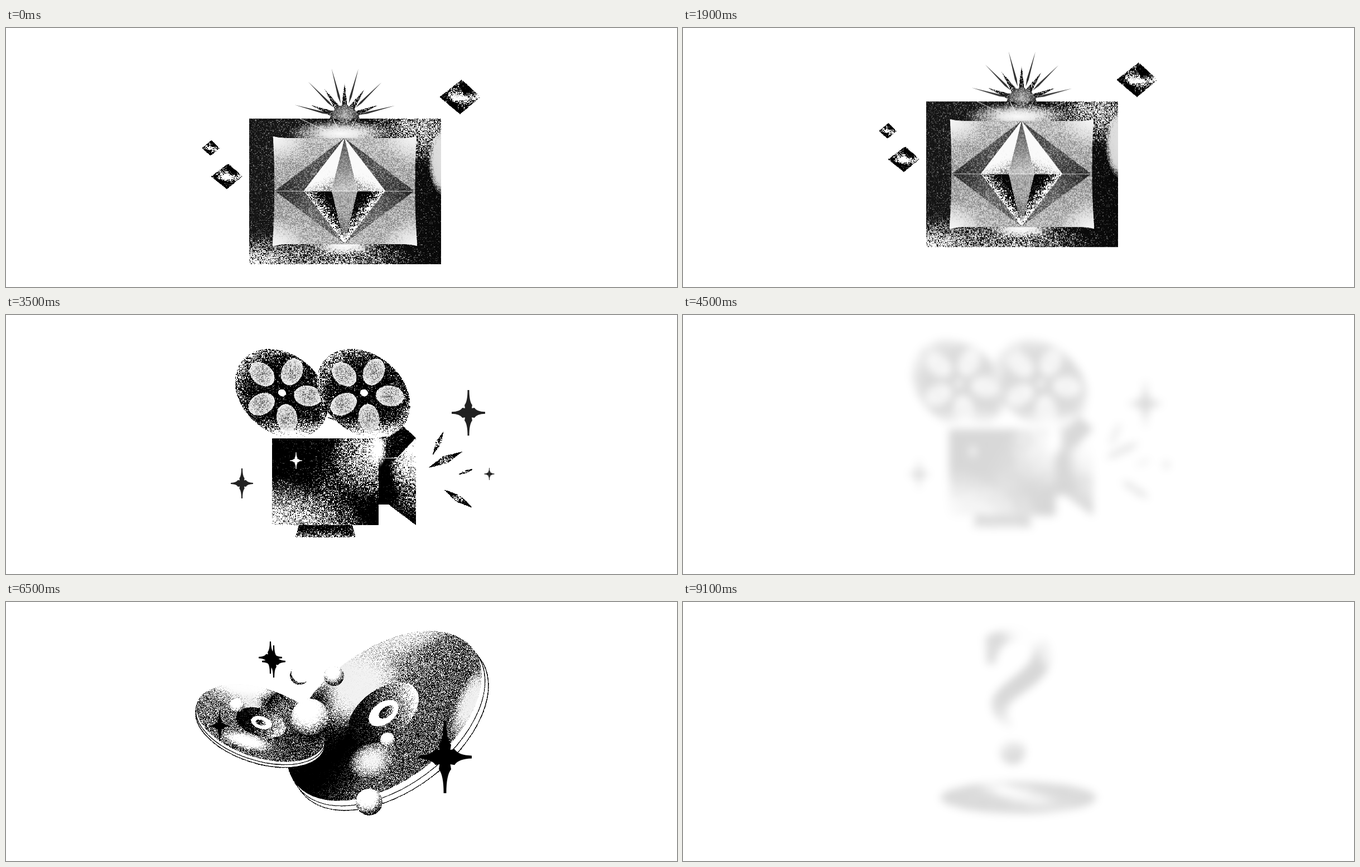
An HTML page with a canvas that plays this animation: 1203x466 px, repeating every 9200 ms.

```html
<!DOCTYPE html>
<html lang="en">
<head>
<meta charset="utf-8">
<title>Stippled objects</title>
<style>
  html, body { margin: 0; width: 100%; height: 100%; overflow: hidden; background: #fff; }
  canvas { display: block; }
</style>
</head>
<body>
<canvas id="stage" width="1203" height="466"></canvas>
<script>
const W = 1203, H = 466, SCENE = 2300, RISE = 31, RAD = Math.PI / 180;
let g; // context of the scene being built

// Before the grain pass a colour means: red = share of light specks,
// green = dark speck level, blue = light speck level.
const ink = ([p, d = 0, l = 255], a = 1) => `rgba(${p * 255},${d},${l},${a})`;
const clamp = v => Math.max(0, Math.min(1, v));
const polar = (x, y, r, deg) => [x + r * Math.cos(deg * RAD), y + r * Math.sin(deg * RAD)];

const poly = (...pts) => {
  const p = new Path2D();
  for (let i = 0; i < pts.length; i += 2) p.lineTo(pts[i], pts[i + 1]);
  p.closePath();
  return p;
};
const oval = (x, y, rx, ry = rx, deg = 0) => {
  const p = new Path2D();
  p.ellipse(x, y, rx, ry, deg * RAD, 0, 7);
  return p;
};
const box = (x, y, x2, y2) => poly(x, y, x2, y, x2, y2, x, y2);

// Long thin rhombus; wide is where its broadest point lies
const spike = (x, y, x2, y2, w, wide = 0) => {
  const n = w / Math.hypot(x2 - x, y2 - y), ox = (y - y2) * n, oy = (x2 - x) * n;
  const mx = x + (x2 - x) * wide, my = y + (y2 - y) * wide;
  return poly(x, y, mx + ox, my + oy, x2, y2, mx - ox, my - oy);
};

const ramp = (grad, tones) => {
  tones.forEach((t, i) => grad.addColorStop(i / (tones.length - 1), ink(t)));
  return grad;
};
const lin = (x, y, x2, y2, ...tones) => ramp(g.createLinearGradient(x, y, x2, y2), tones);
const rad = (x, y, r, ...tones) => ramp(g.createRadialGradient(x, y, 0, x, y, r), tones);

// Shine around a centre: light(deg) gives the share of light, bright parts turn smooth grey
const sweep = (x, y, light) => ramp(g.createConicGradient(0, x, y), Array.from({ length: 61 }, (_, i) => {
  const p = clamp(light(i * 6)), smooth = clamp((p - 0.5) / 0.45);
  return [p, 210 * smooth, 255 - 18 * smooth];
}));
const bump = (deg, mid, width) => {
  const d = Math.abs(deg - mid);
  return Math.exp(-((Math.min(d, 360 - d) / width) ** 2));
};

function fill(path, paint) {
  g.fillStyle = Array.isArray(paint) ? ink(paint) : paint;
  g.fill(path);
}

// Soft elliptical patch of one tone, kept inside a path
function glow(clip, x, y, rx, ry, deg, tone, solid = 0.3) {
  g.save();
  g.clip(clip);
  g.translate(x, y);
  g.rotate(deg * RAD);
  g.scale(rx, ry);
  const grad = g.createRadialGradient(0, 0, 0, 0, 0, 1);
  grad.addColorStop(0, ink(tone));
  grad.addColorStop(solid, ink(tone, 0.85));
  grad.addColorStop(1, ink(tone, 0));
  g.fillStyle = grad;
  g.fillRect(-1, -1, 2, 2);
  g.restore();
}

function line(x, y, x2, y2) {
  g.strokeStyle = "rgba(255,255,255,.75)";
  g.lineWidth = 1.2;
  g.beginPath();
  g.moveTo(x, y);
  g.lineTo(x2, y2);
  g.stroke();
}

function star(x, y, rx, ry, color = "#000") {
  g.fillStyle = color;
  for (const sx of [-1, 1]) for (const sy of [-1, 1]) {
    g.save();
    g.translate(x, y);
    g.scale(rx * sx, ry * sy);
    g.beginPath();
    g.moveTo(-0.02, -0.02);
    g.lineTo(-0.02, 1);
    g.lineTo(0.05, 1);
    g.quadraticCurveTo(0.05, 0.5, 0.23, 0.34);
    g.lineTo(0.2, 0.2);
    g.lineTo(0.36, 0.22);
    g.quadraticCurveTo(0.5, 0.05, 1, 0.04);
    g.lineTo(1, -0.02);
    g.fill();
    g.restore();
  }
}

function gem(x, y, rx, ry) {
  const shape = poly(x - rx, y, x + rx * 0.08, y - ry, x + rx, y, x, y + ry);
  fill(shape, lin(0, y - ry, 0, y + ry, [0.15], [0.3], [0.75], [0.25], [0.05]));
  glow(shape, x + rx * 0.4, y - ry * 0.5, rx * 0.55, ry * 0.6, 40, [0]);
  glow(shape, x - rx * 0.4, y + ry * 0.5, rx * 0.55, ry * 0.6, 40, [0]);
  glow(shape, x - rx * 0.9, y, rx * 0.5, ry * 0.6, 0, [0.1]);
  glow(shape, x, y + ry * 0.08, rx * 0.65, ry * 0.3, 0, [0.95]);
}

function jewel() {
  const frame = box(436, 163, 780, 425);
  fill(frame, lin(436, 0, 780, 0, [0.2, 20, 110], [0.22, 20, 130], [0.25, 15, 150], [0.15, 12, 200], [0.1, 8, 160]));
  glow(frame, 450, 425, 150, 60, 0, [0.75, 10]);
  glow(frame, 600, 420, 140, 48, 0, [0.5, 20, 240]);
  glow(frame, 745, 180, 90, 70, 0, [0.65, 20, 240]);
  glow(frame, 785, 240, 28, 62, 0, [1, 225, 225], 0.65);
  glow(frame, 600, 190, 95, 24, 0, [1, 225, 250]);
  glow(frame, 607, 392, 62, 17, 0, [1, 200, 250]);

  const panel = new Path2D("M479 195Q490 198 500 198H715Q726 198 736 195Q730 293 737 392Q726 389 715 389H500Q490 389 478 393Q484 293 479 195Z");
  fill(panel, lin(0, 196, 0, 392, [0.55, 160, 215], [0.45, 135, 200], [0.55, 150, 210]));
  for (const x of [480, 735]) for (const y of [196, 392])
    glow(panel, x, y, 62, 50, 0, [1, 240, 245], 0.2);

  // Each half mirrors the other about the middle axis
  for (const side of [-1, 1]) {
    const at = dx => 607 + side * dx;
    const facet = (tip, a, b, paint) => fill(poly(607, tip, at(a), 293, at(b), 293), paint);
    facet(198, 125, 73, lin(607, 205, at(115), 293, [0.35, 55, 120], [0.4, 70, 150], [0.3, 40, 110]));
    facet(198, 73, 23, lin(at(42), 240, at(18), 292, [1, 240, 250], [0.9, 205, 250], [0.4, 90, 230]));
    facet(388, 125, 73, lin(at(115), 293, 607, 385, [0.25, 35, 100], [0.45, 85, 160], [0.4, 70, 175]));
    facet(388, 73, 23, lin(at(19), 300, at(51), 326, [0, 5], [0.18, 5], [0.85, 20]));
  }
  fill(poly(607, 198, 584, 293, 630, 293), lin(590, 210, 610, 293, [0.3, 80, 130], [0.4, 125, 165], [0.6, 175, 215]));
  fill(poly(607, 388, 584, 293, 630, 293), lin(600, 293, 613, 388, [0.5, 155, 190], [0.5, 125, 185], [0.3, 60, 120]));
  glow(poly(534, 293, 680, 293, 607, 388), 607, 388, 25, 34, 0, [0.8, 40]);

  for (let deg = 202; deg < 340; deg += 34) {
    const [x, y] = polar(607, 163, 64, deg);
    fill(spike(607, 163, x, y, 8), lin(607, 163, x, y, [0.5, 90, 170], [0.3, 15, 180], [0.25, 20, 180]));
  }
  fill(new Path2D("M580 163Q588 139 607 139Q626 139 634 163Z"), rad(607, 158, 30, [0.6, 150, 200], [0.4, 90, 160], [0.25, 40, 140]));
  gem(814, 124, 37, 31);
  gem(396, 267, 28, 23);
  gem(367, 216, 16, 14);
}
function jewelTop() {
  g.fillStyle = "#333";
  for (let deg = 195.5; deg < 360; deg += 30)
    g.fill(spike(...polar(607, 163, 28, deg), ...polar(607, 163, 93, deg), 1.9, 0.2));
  line(483, 293.5, 733, 293.5);
  for (const dx of [-80, -21, 21, 80]) {
    line(607 + dx, 163, 607 + dx * 0.42, 185);
    line(607 + dx * 0.2, 396, 607 + dx * 0.9, 425);
  }
}

function camera() {
  fill(poly(575, 184, 668, 222, 668, 258, 702, 256, 735, 221, 712, 200),
    lin(600, 200, 725, 235, [0.3], [0.7], [0.6], [0.12], [0.05]));
  for (const x of [495, 642]) {
    const reel = oval(x - 1, 141, 92, 70, 40);
    fill(reel, rad(x + 3, 146, 92, [0.12], [0.12], [0.14], [0.22], [0.6]));
    glow(reel, x + 15, 225, 100, 42, 0, [1, 30]);
    for (let deg = 7; deg < 360; deg += 72) {
      const [hx, hy] = polar(x, 140, 45 + 4 * Math.cos(2 * (deg - 40) * RAD), deg);
      fill(oval(hx, hy, 25, 18.5, deg), rad(hx, hy, 25, [0.55, 95, 225], [0.6, 130, 225], [0.85, 185, 240]));
    }
    fill(oval(x, 140, 7, 6, 20), [1, 255]);
  }

  const body = box(477, 222, 668, 378);
  fill(body, lin(480, 225, 668, 350, [0.06], [0.05], [0.1], [0.3], [0.12], [0.04]));
  glow(body, 475, 390, 125, 100, 0, [0.95, 110], 0.25);
  glow(body, 555, 400, 105, 75, 0, [0.65, 20]);
  glow(body, 668, 245, 85, 95, 0, [0.9, 20], 0.2);
  const lens = poly(668, 258, 702, 258, 735, 221, 735, 378, 686, 341, 668, 341);
  fill(lens, lin(670, 0, 735, 0, [0.02], [0.05], [0.3], [0.45]));
  glow(lens, 727, 245, 40, 80, 10, [0.95, 30]);
  glow(lens, 725, 375, 45, 45, 0, [0.05]);
  glow(box(640, 222, 735, 290), 669, 240, 13, 35, 0, [1, 255]);
  fill(poly(525, 378, 621, 378, 627, 400, 519, 400), lin(0, 378, 0, 400, [0.08], [0.2], [0.5]));

  for (const [x, y, x2, y2] of [[785, 209, 765, 252], [818, 246, 757, 275], [838, 277, 811, 287], [785, 314, 837, 347]])
    fill(spike(x, y, x2, y2, 0.11 * Math.hypot(x2 - x, y2 - y), 0.5), lin(x, y, x2, y2, [0.05], [0.1], [0.6], [0.1], [0]));
}
function cameraTop() {
  star(829, 176, 30, 41, "#222");
  star(423, 303, 20, 27, "#222");
  star(866.5, 286, 9, 11, "#222");
  star(520, 262, 11, 15, "#fff");
}

function ball(x, y, r, dark = 0.1) {
  fill(oval(x, y, r), rad(x - r * 0.15, y - r * 0.4, r * 1.45, [1, 255], [1, 250], [0.88, 120], [dark + 0.3, 30], [dark]));
}
function plate(x, y, a, b, deg) {
  const p = oval(x, y, a, b, deg);
  fill(p, [1, 255]);
  g.strokeStyle = ink([0]);
  g.lineWidth = 1.5;
  g.stroke(p);
}
function discs() {
  plate(690, 222, 200, 118, -37);
  plate(684, 214, 200, 118, -37);
  const big = oval(678, 205, 200, 118, -37);
  fill(big, sweep(678, 200, a => 0.38 - 0.38 * bump(a, 140, 25) + 0.55 * bump(a, 222, 36) + 0.14 * bump(a, 290, 25)));
  glow(big, 640, 150, 85, 55, -50, [0.9, 215, 242]);
  glow(big, 835, 180, 75, 28, -65, [0.92, 215, 240], 0.4);
  glow(big, 720, 60, 130, 36, -22, [0.8, 120, 250]);
  glow(big, 655, 285, 42, 32, -20, [0.9, 200, 245]);
  glow(big, 552, 185, 36, 62, 35, [0.1]);

  fill(oval(677, 200, 72, 43, -37), lin(615, 220, 740, 180, [0.08], [0.15], [0.25], [0.4], [0.65], [0.95]));
  fill(oval(677, 200, 30, 19, -37), [1, 255]);
  fill(oval(682, 198, 16, 9, -37), lin(668, 196, 697, 203, [0.1], [0.3], [1]));

  plate(456, 228, 120, 62, 18);
  plate(456, 223, 120, 62, 18);
  const small = oval(457, 218, 120, 62, 18);
  fill(small, sweep(457, 217, a => 0.45 + 0.4 * bump(a, 245, 30) - 0.28 * bump(a, 295, 18) - 0.18 * bump(a, 30, 35)));
  glow(small, 425, 146, 70, 26, 10, [1, 255], 0.5);
  glow(small, 432, 250, 48, 15, 15, [1, 255], 0.4);
  fill(oval(457, 217, 46, 25, 18), lin(413, 210, 502, 225, [0.06], [0.12], [0.3], [0.6], [0.8]));
  fill(oval(458, 217, 19, 11, 18), [1, 255]);
  fill(oval(457, 217, 10, 5, 18), lin(447, 215, 468, 219, [0.1], [0.3], [0.9]));

  glow(oval(550, 225, 42, 32), 550, 232, 42, 26, 0, [0.08]);
  ball(545, 207, 33, 0.3);
  ball(588, 133, 18);
  fill(oval(526, 132, 17), [0.3]);
  fill(oval(530, 127, 18), [1, 255]);
  ball(414, 186, 13, 0.3);
  ball(684, 248, 13, 0.4);
  ball(651, 360, 24);
}
function discsTop() {
  star(787, 279, 48, 65);
  star(474, 100, 21, 29);
  star(480, 107, 21, 29);
  star(383, 223, 18, 27);
}

function question() {
  const hook = new Path2D("M543 79L545 128H559C564 100 578 85 599 85C620 85 630 95 628 108C626 126 604 142 581 161C550 185 548 203 561 223C569 235 579 241 587 241H597C581 230 576 213 588 198C606 178 655 158 659 122C664 90 641 65 597 65C574 66 558 71 543 79Z");
  fill(hook, lin(570, 65, 600, 241, [0.18], [0.22], [0.15], [0.05], [0.1], [0.35], [0.75]));
  glow(hook, 620, 74, 62, 30, 20, [0.97], 0.5);
  glow(hook, 655, 105, 25, 38, 0, [0.65]);
  fill(oval(591, 286, 22.5), lin(583, 264, 597, 308, [0.9], [0.45], [0.2], [0.08]));
  const pool = oval(601.5, 368.5, 139.5, 28.5);
  fill(pool, [0.17]);
  glow(pool, 610, 366, 95, 19, 12, [0.75]);
  glow(pool, 580, 356, 46, 12, 14, [1], 0.45);
}

// Turn tones into specks with a fixed hash as noise
function grain(size) {
  const img = g.getImageData(0, 0, W, H), px = img.data, soft = 50;
  for (let y = 0, i = 0; y < H; y++) for (let x = 0; x < W; x++, i += 4) {
    let h = Math.imul(x / size | 0, 374761393) + Math.imul(y / size | 0, 668265263);
    h = Math.imul(h ^ h >>> 13, 1274126177);
    h = Math.imul(h ^ h >>> 15, 2246822519);
    const noise = ((h ^ h >>> 16) >>> 0) / 2 ** 32 * (255 - soft);
    const [p, dark, light] = [px[i], px[i + 1], px[i + 2]];
    px[i] = px[i + 1] = px[i + 2] = dark + (light - dark) * clamp((p - noise) / soft);
  }
  g.putImageData(img, 0, 0);
}

function build([shapes, top, base, size]) {
  const cv = document.createElement("canvas");
  cv.width = W;
  cv.height = H;
  g = cv.getContext("2d", { willReadFrequently: true });
  g.fillStyle = ink([1]);
  g.fillRect(0, 0, W, H);
  shapes();
  grain(size);
  if (top) top();
  return { cv, base };
}

// Shapes, crisp details on top, resting offset, speck size
const scenes = [
  [jewel, jewelTop, 0, 1.35],
  [camera, cameraTop, 20.3, 1.35],
  [discs, discsTop, 30.8, 1],
  [question, null, 20.3, 1.35]
].map(build);

const ctx = document.getElementById("stage").getContext("2d");
const start = performance.now();

function frame() {
  const t = Math.max(0, performance.now() - start) % (SCENE * scenes.length);
  const { cv, base } = scenes[t / SCENE | 0], local = t % SCENE;
  const rise = RISE * (0.5 - 0.5 * Math.cos(Math.PI * Math.min(1, local / 2000)));
  const out = Math.max(0, (local - 1930) / 370);
  ctx.filter = "none";
  ctx.globalAlpha = 1;
  ctx.fillStyle = "#fff";
  ctx.fillRect(0, 0, W, H);
  ctx.globalAlpha = (1 - out) ** 1.4;
  if (out) ctx.filter = `blur(${10 * out}px)`;
  ctx.drawImage(cv, 0, base - rise - 8 * out);
  requestAnimationFrame(frame);
}
frame();
</script>
</body>
</html>
```
